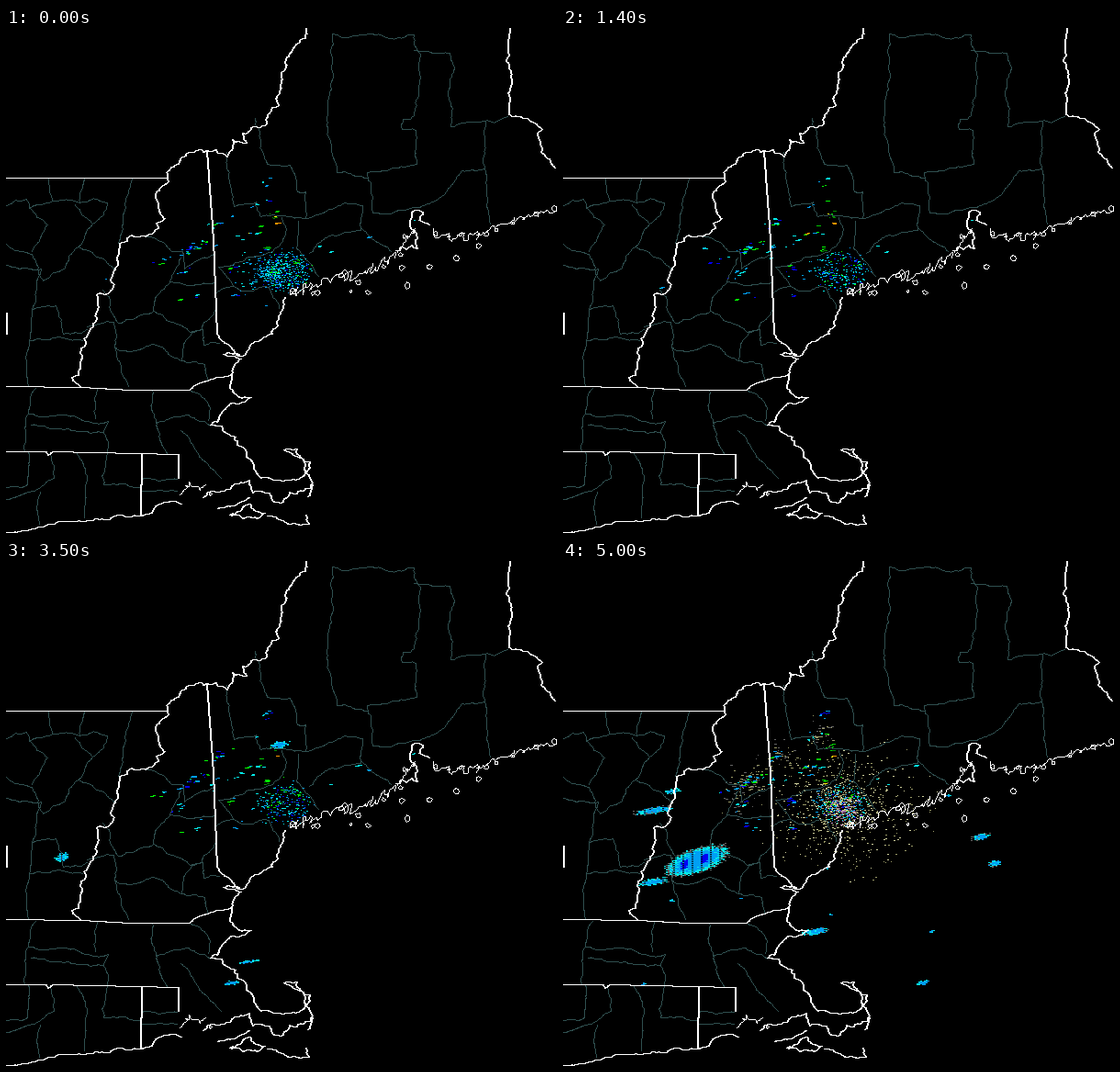
Write a matplotlib script that moves like this. It is 600 by 550 pixels and loops after 5100 ms.

```python
import numpy as np
import matplotlib.pyplot as plt
from matplotlib.animation import FuncAnimation

W, H, FRAMES, STEP = 600, 550, 51, 100
CLEAR_AIR = 47          # first frame of the sensitive scan mode
DRIFT = 10.3            # eastward cell motion, pixels per frame
EAST_LIMIT = 526

ECHO = np.array([(4, 233, 231), (1, 159, 244), (3, 0, 244), (2, 253, 2),
                 (1, 197, 1), (0, 142, 0), (253, 248, 2), (253, 149, 0)])
TAN, KHAKI, GRAY = (204, 204, 153), (153, 153, 102), (100, 100, 100)
MAUVE, PLUM = (204, 153, 204), (153, 102, 153)
SLATE, WHITE = (47, 79, 79), (255, 255, 255)

rng = np.random.default_rng(7)
county_mask = np.zeros((H, W), bool)
border_mask = np.zeros((H, W), bool)


# ---- Map ----
def points(xy):
    return np.array(xy, float).reshape(-1, 2)


def fractal(pts, amp):
    """Midpoint displacement until every piece is a few pixels long."""
    out = [pts[0]]
    for a, b in zip(pts[:-1], pts[1:]):
        d = b - a
        size = np.hypot(*d)
        if amp and size > 4:
            mid = (a + b) / 2 + np.array([-d[1], d[0]]) * rng.normal(0, amp)
            out.extend(fractal(np.array([a, mid]), amp)[1:])
            out.extend(fractal(np.array([mid, b]), amp)[1:])
        else:
            out.append(b)
    return np.array(out)


def stroke(mask, pts, thick=1):
    for a, b in zip(pts[:-1], pts[1:]):
        n = int(max(abs(b - a))) + 2
        x, y = np.rint(np.linspace(a, b, n)).astype(int).T
        for k in range(thick):
            mask[np.clip(y, 0, H - 1), np.clip(x + k, 0, W - 1)] = True


def county(*xy):
    stroke(county_mask, fractal(points(xy), 0.07))


def border(*xy):
    stroke(border_mask, points(xy), 2)


def shore(amp, *xy):
    stroke(border_mask, fractal(points(xy), amp), 2)


def inlets(depth, *xy):
    """A coast cut by narrow bays, with small islands in front of it."""
    base = points(xy)
    walk = []
    for a, b in zip(base[:-1], base[1:]):
        n = int(np.hypot(*(b - a)) / 3.5) + 1
        for s in np.arange(n) / n:
            walk.append(a + (b - a) * s
                        + np.array([-0.45, 1]) * rng.uniform(-depth, depth))
    stroke(border_mask, fractal(np.array(walk), 0.15))
    for x, y in walk[::5]:
        island(x + rng.normal(0, 4), y + rng.uniform(0, 1.4 * depth),
               rng.uniform(1, 3.5))


def island(x, y, r):
    t = np.linspace(0, 2 * np.pi, 8)
    wobble = rng.uniform(0.5, 1.3, 8)
    wobble[-1] = wobble[0]
    stroke(border_mask, np.c_[x + r * wobble * np.cos(t), y + r * wobble * np.sin(t)])


def draw_borders():
    shore(0.13, 326, 0, 304, 34, 299, 58, 296, 84, 284, 94, 257, 114, 261, 125,
          246, 121, 240, 140, 228, 132, 218, 133, 190, 141, 172, 170, 165, 190,
          160, 222, 123, 234, 121, 258, 98, 290, 84, 338, 82, 358, 71, 380, 81, 391)
    shore(0.08, 548, 0, 547, 94, 583, 110, 582, 135, 597, 152)
    border(0, 163, 174, 163)
    border(0, 310, 0, 333)
    border(0, 390, 81, 391, 135, 394, 199, 394)
    shore(0.06, 199, 394, 224, 382, 245, 377)
    border(218, 133, 225, 230, 229, 333)
    shore(0.06, 229, 333, 243, 346, 253, 357)
    border(0, 461, 43, 461, 45, 465, 50, 461, 187, 464, 187, 490)
    border(147, 463, 146, 531)


def draw_coast():
    inlets(3.5, 599, 198, 575, 201, 530, 215, 508, 230)
    inlets(5, 514, 226, 480, 227, 460, 222)
    shore(0.2, 460, 214, 444, 198, 440, 218, 424, 242)
    inlets(4, 446, 215, 424, 246)
    inlets(8, 424, 248, 390, 266, 345, 274, 303, 293)
    shore(0.12, 303, 293, 294, 320, 257, 357, 236, 355, 255, 360, 245, 378,
          243, 392, 266, 402, 236, 416, 222, 432, 240, 441, 262, 468, 274, 487,
          300, 493, 323, 488, 324, 472, 302, 459, 316, 458, 330, 472, 333, 495,
          328, 510)
    shore(0.15, 333, 497, 268, 506, 264, 492, 240, 502, 214, 511)
    inlets(10, 214, 503, 188, 503)
    shore(0.08, 190, 518, 146, 531, 90, 536, 0, 549)
    shore(0.08, 264, 511, 230, 523)
    shore(0.12, 243, 530, 258, 520, 281, 528, 262, 532, 243, 530)
    shore(0.12, 284, 531, 308, 540, 329, 540, 326, 530)
    for x, y in [(394, 288), (437, 280), (460, 259), (490, 250)]:
        island(x, y, 3)


def draw_counties():
    # northeast
    county(354, 66, 355, 6, 444, 7, 444, 95, 432, 99, 431, 110, 446, 111, 447, 148,
           393, 157, 399, 201, 443, 195, 474, 183, 496, 155, 521, 153, 522, 101)
    county(354, 66, 349, 105, 360, 157, 393, 163)
    county(444, 24, 483, 27, 484, 107, 546, 96)
    county(521, 153, 527, 213)
    county(271, 98, 284, 148, 309, 149, 317, 178, 326, 178, 326, 207, 277, 205,
           272, 189, 248, 194, 240, 135)
    county(300, 206, 301, 232, 280, 247, 231, 260, 247, 281, 229, 288)
    county(247, 281, 286, 282, 297, 305)
    county(326, 207, 366, 191, 388, 193, 386, 220, 330, 245)
    county(318, 210, 316, 240, 340, 270)
    county(387, 218, 419, 243)
    # centre
    county(150, 226, 192, 243, 194, 262, 226, 246)
    county(190, 250, 178, 276, 227, 277)
    county(105, 285, 123, 321, 160, 308, 162, 295, 178, 277)
    county(88, 325, 117, 320, 118, 347, 133, 390)
    county(118, 347, 164, 345, 191, 362, 216, 366, 219, 383)
    county(160, 308, 200, 331, 213, 327, 228, 306)
    county(191, 362, 195, 340, 213, 327, 215, 345, 232, 343)
    # west
    county(0, 193, 22, 186, 25, 196, 50, 188, 46, 164)
    county(85, 164, 80, 190, 50, 188)
    county(25, 196, 45, 214, 28, 243)
    county(0, 235, 28, 246, 40, 275, 78, 238, 118, 263)
    county(75, 192, 94, 213, 78, 238)
    county(94, 213, 110, 190, 80, 190)
    county(137, 164, 122, 234)
    county(0, 258, 38, 262, 28, 306, 24, 390)
    county(28, 306, 54, 302, 62, 333, 88, 328)
    county(26, 340, 83, 340)
    # south
    county(32, 392, 24, 420, 20, 461)
    county(24, 420, 111, 428, 106, 440, 110, 461)
    county(99, 393, 97, 425)
    county(27, 432, 106, 440)
    county(159, 394, 163, 428, 175, 463)
    county(163, 429, 222, 433)
    county(199, 394, 222, 413, 220, 427)
    county(190, 438, 205, 458, 234, 490)
    county(24, 462, 22, 498, 0, 500)
    county(0, 513, 52, 490, 47, 463)
    county(37, 505, 36, 540)
    county(77, 463, 86, 503, 85, 533)
    county(110, 462, 106, 497, 147, 500)
    for y in (491, 504):
        county(147, y, 186, y)


# ---- Echoes ----
def clutter_group(x, y, spread, count, level):
    """Ground echoes strung along a rising ridge: x, y, width, level."""
    dx = rng.normal(0, spread, count)
    return np.c_[x + dx, y - 0.35 * dx + rng.normal(0, 1 + spread / 4, count),
                 rng.integers(2, 6, count),
                 np.clip(np.rint(rng.normal(level, 1, count)), 0, 7)]


GROUND = np.vstack([clutter_group(*g) for g in [
    (286, 166, 8, 5, 1), (284, 188, 9, 6, 1), (293, 202, 4, 6, 4),
    (295, 212, 1, 2, 7), (270, 222, 6, 4, 4), (283, 240, 3, 5, 4),
    (231, 212, 7, 14, 2), (204, 238, 9, 26, 2), (172, 251, 9, 5, 2),
    (188, 268, 9, 8, 1), (244, 262, 4, 5, 2), (249, 289, 4, 4, 1),
    (210, 285, 14, 5, 1), (245, 235, 18, 12, 0), (375, 234, 30, 5, 0)]])

# Drifting storms at their peak: frame, x, y, half length, half width
STORMS = [
    (6, 129, 232, 9, 3), (22, 144, 236, 7, 2), (22, 129, 265, 7, 1.3),
    (35, 60, 322, 6, 4), (35, 245, 459, 7, 2), (35, 263, 436, 9, 1.3),
    (35, 297, 200, 9, 3.5), (42, 135, 314, 9, 3), (42, 128, 326, 8, 4),
    (42, 46, 327, 7, 2), (42, 497, 180, 12, 2), (42, 513, 195, 9, 2),
    (42, 308, 447, 6, 2), (42, 308, 460, 7, 3), (50, 145, 326, 31, 12),
    (50, 98, 349, 14, 3), (50, 98, 271, 18, 3), (50, 119, 250, 8, 2),
    (50, 274, 403, 12, 3), (50, 391, 459, 6, 2.3), (50, 469, 329, 6, 3),
    (50, 454, 300, 8, 3)]
STORMS += [(rng.integers(0, 30), rng.uniform(60, 160), rng.uniform(210, 300), 2.5, 1)
           for _ in range(8)]
STORMS += [(rng.integers(42, 51), rng.uniform(60, 500), rng.uniform(240, 470), 3.5, 1.3)
           for _ in range(12)]

CLOUD = 520
turn = rng.uniform(0, 2 * np.pi, CLOUD)
reach = np.sqrt(rng.uniform(0, 1, CLOUD))
cloud_x = 304 + 27 * reach * np.cos(turn) + rng.normal(0, 3, CLOUD)
cloud_y = 264 + 20 * reach * np.sin(turn) + rng.normal(0, 3, CLOUD)
cloud_level = rng.choice(5, CLOUD, p=[0.38, 0.38, 0.14, 0.06, 0.04])


def dash(img, x, y, w, color):
    x, y = int(round(x)), int(round(y))
    img[y, x:x + int(w)] = color


def draw_storm(img, i, storm, seed):
    peak, x, y, a, b = storm
    big = b > 8
    age = i - peak
    power = 1 - abs(age / (8 if big else 4.5)) ** 1.5
    if power <= 0.05:
        return
    x += DRIFT * age
    a, b = a * power ** 0.5, b * power ** 0.5
    r = np.random.default_rng(seed)
    for v in range(-int(b) - 3, int(b) + 4):
        for u in range(-int(a) - 4, int(a) + 5, 2):
            px, py = x + u, y + v - (0.3 if big else 0.15) * u
            val = 1.1 - (u / a) ** 2 - (v / b) ** 2 + r.normal(0, 0.2 if big else 0.4)
            if not 30 < px < EAST_LIMIT:
                continue
            if val > 0:
                core = big and abs(v) < 5 and np.cos(0.285 * (u + 14)) * val > 0.45
                dash(img, px, py, 2, ECHO[2 if core else int(val > 0.45)])
            elif i >= CLEAR_AIR and val > -0.2 and b > 2.5:
                dash(img, px, py, 2, GRAY)


def scatter(img, r, x, y, spread, n, colors):
    for _ in range(n):
        dash(img, r.normal(x, spread), r.normal(y, 0.8 * spread), r.integers(1, 4),
             colors[r.integers(len(colors))])


def draw_clear_air(img, r):
    for _ in range(1000):
        ang, d = r.uniform(0, 2 * np.pi), 4 + abs(r.normal(0, 46))
        if d < 108:
            dash(img, 303 + d * np.cos(ang), 268 + 0.78 * d * np.sin(ang),
                 r.integers(1, 3), TAN if r.random() < 0.6 else KHAKI)
    for x, y, n in [(200, 240, 70), (190, 262, 30), (240, 212, 40), (280, 188, 35)]:
        scatter(img, r, x, y, 10, n, (GRAY, KHAKI))
    scatter(img, r, 303, 271, 8, 70, (MAUVE, PLUM))


def draw_ground(img, r):
    for x, y, w, level in GROUND:
        if r.random() < 0.75:
            k = int(level) + r.choice([-1, 0, 0, 0, 1])
            for row in range(r.integers(1, 3)):
                dash(img, x + r.integers(-1, 2) - row, y + row,
                     max(1, w - r.integers(0, 2)), ECHO[np.clip(k, 0, 7)])


def draw_cloud(img, i, r):
    share = 0.4 + 0.35 * np.exp(-i / 5)
    for x, y, level in zip(cloud_x, cloud_y, cloud_level):
        if r.random() < share:
            dash(img, x, y, r.integers(1, 3), ECHO[level])
    scatter(img, r, 280, 266, 13, int(20 + 110 * np.exp(-i / 3)), ECHO[:2])
    for x, y in [(317, 256), (291, 267)]:
        scatter(img, r, x, y, 3, 12, ECHO[1:5])


def scan(i):
    img = np.zeros((H, W, 3), np.uint8)
    r = np.random.default_rng(100 + i)
    if i >= CLEAR_AIR:
        draw_clear_air(img, r)
    draw_cloud(img, i, r)
    draw_ground(img, r)
    for k, storm in enumerate(STORMS):
        draw_storm(img, i, storm, 500 + k)
    img[county_mask] = SLATE
    img[border_mask] = WHITE
    return img


draw_counties()
draw_borders()
draw_coast()

fig = plt.figure(figsize=(W / 100, H / 100), dpi=100, facecolor="black")
ax = fig.add_axes([0, 0, 1, 1])
ax.axis("off")
radar = ax.imshow(scan(0), interpolation="nearest", aspect="auto")


def update(i):
    radar.set_data(scan(i))
    return (radar,)


anim = FuncAnimation(fig, update, frames=FRAMES, interval=STEP, repeat=True)
plt.show()
```
